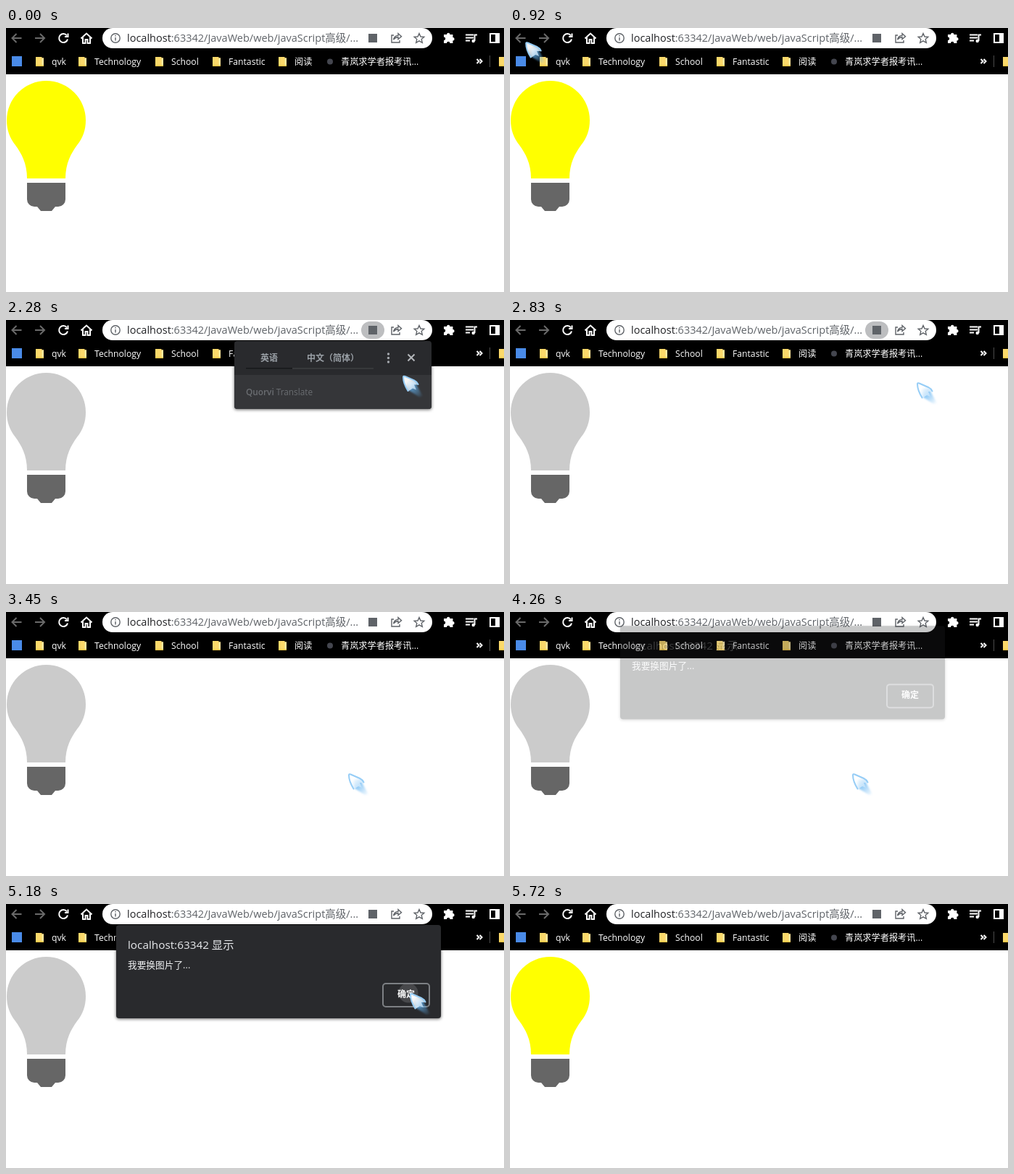
These frames come from a looping animation (687 by 365 pixels, 6.27 s). An HTML page:

```html
<!DOCTYPE html>
<html lang="zh-CN">
<head>
<meta charset="utf-8">
<title>Light bulb demo</title>
<style>
  html, body { margin: 0; width: 100%; height: 100%; overflow: hidden; background: #fff; }
  svg { display: block; width: 687px; height: 365px; }
  text { font-family: "Open Sans", "Noto Sans CJK SC", "Noto Sans CJK", sans-serif; white-space: pre; }
  .marks text { font-size: 12.2px; font-weight: 500; fill: #fff; }
  .line { fill: none; stroke-width: 2; }
  .panel { filter: drop-shadow(0 1px 2px rgba(0, 0, 0, .6)); }
</style>
</head>
<body>
<svg viewBox="0 0 687 365">
  <defs>
    <g id="folder">
      <path d="M0 0H8.5V1.5H11V13H0Z" fill="#fbd96a"/>
      <path d="M8.5 1.5H11V13H8.5Z" fill="#ffe9a0"/>
      <path d="M0 11.5H11V13H0Z" fill="#f1c645"/>
    </g>
    <linearGradient id="tailFill" x1="0" y1="0" x2="1" y2="1">
      <stop offset=".2" stop-color="#63b4f2" stop-opacity=".85"/>
      <stop offset="1" stop-color="#63b4f2" stop-opacity="0"/>
    </linearGradient>
    <linearGradient id="bodyFill" x1="0" y1="0" x2="1" y2="1">
      <stop offset=".3" stop-color="#fff" stop-opacity=".95"/>
      <stop offset="1" stop-color="#b5dcfa" stop-opacity=".7"/>
    </linearGradient>
    <filter id="soft" x="-50%" y="-50%" width="200%" height="200%"><feGaussianBlur stdDeviation="1.2"/></filter>
    <clipPath id="okClip"><rect x="521" y="111" width="62" height="30" rx="3"/></clipPath>
  </defs>

  <rect width="687" height="365" fill="#fff"/>
  <g id="bulb">
    <path id="glass" d="M1 127.5A54.5 54.5 0 0 1 110 127.5C110 141 106 152 98 162C90 173 82 187 82 208H29C29 187 21 173 13 162C5 152 1 141 1 127.5Z"/>
    <path d="M29 214H82V237A10 10 0 0 1 72 247H68L63 253H48L43 247H39A10 10 0 0 1 29 237Z" fill="#666"/>
  </g>

  <rect width="687" height="64" fill="#000"/>
  <circle id="reloadHover" cx="79" cy="14" r="14" fill="#202124"/>
  <g class="line" stroke="#6a6a6a" stroke-width="1.6">
    <path d="M21.5 14H9M14.5 8L8.5 14L14.5 20"/>
    <path d="M40 14H53M47 8L53 14L47 20"/>
  </g>
  <g class="line" stroke="#fff">
    <path d="M84 10.5A6 6 0 1 0 85 15.5"/>
    <path d="M85.500 7.500V12H81"/>
    <path d="M103.5 14.5L111 7.5L118.5 14.5M106 13V21H109.5V16H112.5V21H116V13"/>
    <path d="M634 9.5H645M634 13.5H645M634 17.5H640M646.5 18V9.5H650"/>
    <rect x="668" y="8" width="12" height="12"/>
  </g>
  <g fill="#fff">
    <circle cx="644.7" cy="18" r="2.2"/>
    <path d="M675 8H680V20H675Z"/>
    <path d="M604 9h4a2.2 2.2 0 0 1 4.4 0h4v4a2.2 2.2 0 0 1 0 4.4V21h-4a2.2 2.2 0 0 0-4.4 0h-4v-4a2.2 2.2 0 0 0 0-4.4z"/>
    <rect x="133" width="455" height="28" rx="14"/>
  </g>
  <rect id="chip" x="490" y="2" width="32" height="24" rx="12" fill="#bdbec0"/>
  <g class="line" stroke="#5f6368" style="stroke-width: 1.4">
    <circle cx="151" cy="14" r="6.2"/>
    <path d="M151 13V17.5M151 10V11.6"/>
    <path d="M535 10H532V20H543V17M534.5 16C535.5 12 538 10.5 541 10.5V7.5L545.5 11.7L541 15.5V12.8C538 12.8 536.3 13.8 534.5 16Z"/>
    <path d="M570 7.5L572 12L576.8 12.4L573.2 15.6L574.3 20.3L570 17.8L565.7 20.3L566.8 15.6L563.2 12.4L568 12Z"/>
  </g>
  <rect x="500" y="8" width="12" height="12" fill="#5f6368"/>
  <text x="167" y="19" font-size="14.5" fill="#5f6368"><tspan fill="#202124">localhost</tspan>:63342/JavaWeb/web/javaScript高级/...</text>

  <g class="marks">
    <rect x="8" y="39" width="14" height="14" fill="#4a8be8"/>
    <use href="#folder" x="41" y="40"/><text x="63" y="51">qvk</text>
    <use href="#folder" x="100" y="40"/><text x="122" y="51">Technology</text>
    <use href="#folder" x="206" y="40"/><text x="228" y="51">School</text>
    <use href="#folder" x="285" y="40"/><text x="307" y="51">Fantastic</text>
    <use href="#folder" x="376" y="40"/><text x="398" y="51">阅读</text>
    <circle cx="447" cy="46.5" r="4" fill="#44464f"/><text x="462" y="51">青岚求学者报考讯...</text>
    <path class="line" d="M649.5 43L652.5 46L649.5 49M653.5 43L656.5 46L653.5 49" stroke="#fff"/>
    <path d="M667 38H668V54H667Z" fill="#4a4a4a"/>
    <use href="#folder" x="680" y="40"/>
  </g>

  <g id="popup" class="panel">
    <rect x="315" y="29" width="272" height="94" rx="4" fill="#292a2d"/>
    <path d="M315 76H587V119A4 4 0 0 1 583 123H319A4 4 0 0 1 315 119Z" fill="#353639"/>
    <path d="M331 66H395V67.5H331Z" fill="#17181a"/>
    <path d="M395 66.5H507V67.5H395Z" fill="#46484b"/>
    <g font-size="12" font-weight="600" fill="#9aa0a6">
      <text x="351" y="57">英语</text>
      <text x="415" y="57">中文（简体）</text>
    </g>
    <g fill="#a4a8ad"><circle cx="527.5" cy="47" r="1.7"/><circle cx="527.5" cy="52.5" r="1.7"/><circle cx="527.5" cy="58" r="1.7"/></g>
    <path class="line" d="M554.5 47.5L563.5 56.5M563.5 47.5L554.5 56.5" stroke="#b4b7bb"/>
    <text x="331" y="104" font-size="11.8" fill="#6a6d71"><tspan font-weight="600">Quorvi</tspan> Translate</text>
  </g>

  <g id="dialog" class="panel">
    <rect x="152" y="29" width="448" height="129" rx="4" fill="#292a2d"/>
    <text x="168" y="62" font-size="15.3" fill="#e8eaed">localhost:63342 显示</text>
    <text x="168" y="89" font-size="12.7" fill="#f1f3f4">我要换图片了...</text>
    <rect class="line" x="520" y="110" width="64" height="32" rx="4" stroke="#7d8084"/>
    <g clip-path="url(#okClip)"><circle id="ripple" cx="555" cy="123" fill="#fff" opacity=".14"/></g>
    <text x="552" y="128.500" text-anchor="middle" font-size="12" font-weight="600" fill="#fff">确定</text>
  </g>

  <g id="cursor">
    <path d="M8 9L17 9L28 29L23 30L17 26L9 21Z" fill="url(#tailFill)" filter="url(#soft)"/>
    <path d="M1 1L16 7Q21 9 22 13L16 13L19 20L14 18L8 22Q1 11 1 1Z" fill="url(#bodyFill)"/>
    <path class="line" d="M7.500 21.500Q1 11 1 2.500Q1 .500 3.500 1.500L16 7Q20 9 21.500 12.500" stroke="#96cdf6" stroke-linecap="round"/>
  </g>
</svg>
<script>
  const LOOP = 6270, STEP = 1000 / 15, PHASE = 43;
  const ui = {};
  for (const el of document.querySelectorAll("svg > [id], #glass, #ripple")) ui[el.id] = el;

  // Pointer moves: start, end, x, y reached
  const moves = [
    [510, 880, 13, 20], [880, 1110, 76, 12], [1180, 1300, 335, 176], [1310, 1440, 364, 186],
    [1780, 2240, 547, 77], [2240, 2400, 548, 48], [2470, 2700, 574, 66],
    [2700, 3300, 472, 223], [4570, 4900, 557, 123], [5590, 5640, 518, 241]
  ];

  const ramp = (t, a, b) => Math.min(1, Math.max(0, (t - a) / (b - a)));
  const within = (t, a, b) => t >= a && t < b;
  const pulse = (t, in0, in1, out0, out1) => ramp(t, in0, in1) - ramp(t, out0, out1);

  function pointer(t) {
    if (t < 510) return [363, 190];
    let x = 483, y = 38;
    for (const [a, b, toX, toY] of moves) {
      const p = ramp(t, a, b);
      x += (toX - x) * p;
      y += (toY - y) * p;
    }
    return [x, y];
  }

  function show(el, alpha) {
    el.style.display = alpha > 0 ? "" : "none";
    el.setAttribute("opacity", alpha);
  }
  const move = (el, transform) => el.setAttribute("transform", transform);

  function draw(time) {
    const t = Math.floor((time - PHASE) / STEP) * STEP + PHASE;

    // The page goes blank for a moment while it reloads
    show(ui.bulb, within(t, 1170, 1240) ? 0 : 1);
    ui.glass.setAttribute("fill", within(t, 1170, 5230) ? "#cbcbcb" : "#ff0");
    show(ui.reloadHover, within(t, 970, 1640) ? 1 : 0);
    show(ui.chip, pulse(t, 1260, 1420, 3160, 3440));

    const popup = pulse(t, 1235, 1367, 2470, 2660);
    show(ui.popup, popup);
    move(ui.popup, `translate(451 76) scale(${0.97 + 0.03 * popup}) translate(-451 -76)`);

    show(ui.dialog, pulse(t, 4200, 4370, 5180, 5380));
    move(ui.dialog, `translate(0 ${12 * pulse(t, 4200, 4440, 5180, 5380) - 12})`);
    ui.ripple.setAttribute("r", 30 * ramp(t, 5050, 5330));

    show(ui.cursor, within(t, 170, 240) || within(t, 500, 5700) ? 1 : 0);
    move(ui.cursor, `translate(${pointer(t)})`);
  }

  const start = performance.now();
  function tick() {
    draw((performance.now() - start) % LOOP);
    requestAnimationFrame(tick);
  }
  tick();
</script>
</body>
</html>
```
